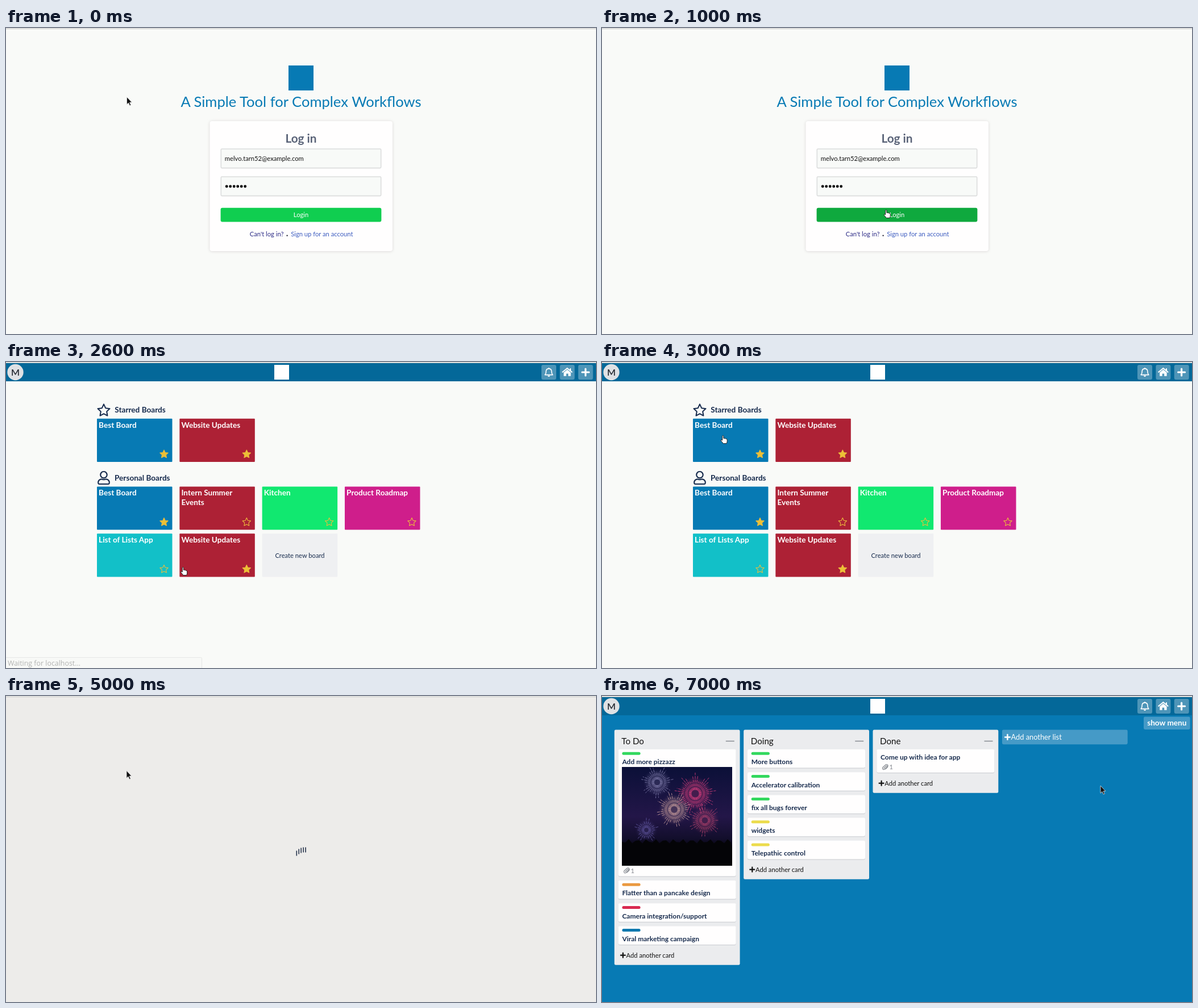
These frames come from a looping animation (1038 by 539 pixels, 8 s). An HTML page:

```html
<!DOCTYPE html>
<html lang="en">
<head>
<meta charset="utf-8">
<title>Kanban board</title>
<style>
html, body { margin: 0; width: 100%; height: 100%; overflow: hidden; background: #f9faf8; }
svg { display: block; width: 1038px; height: 539px; font-family: Lato, sans-serif; }
</style>
</head>
<body>
<svg id="stage" viewBox="0 0 1038 539">
  <defs>
    <filter id="soft" x="-10%" y="-10%" width="120%" height="120%"><feGaussianBlur stdDeviation="2.5"/></filter>
    <linearGradient id="sky" x2="0" y2="1">
      <stop stop-color="#0b1038"/><stop offset=".5" stop-color="#231648"/>
      <stop offset=".73" stop-color="#120e2b"/><stop offset=".82" stop-color="#050408"/>
    </linearGradient>
    <clipPath id="photo"><rect x="35" y="125" width="194" height="174"/></clipPath>
    <path id="star" d="M0-10 3-3.6 10-2.7 4.9 2.1 6.1 9 0 5.7-6.1 9-4.9 2.1-10-2.7-3-3.6Z" stroke-linejoin="round"/>
    <path id="arrow" d="M0 0V13.2L3 10.4 5.2 15.2 7.3 14.2 5.1 9.6H9Z"/>
    <path id="hand" fill="#fff" stroke="#222" stroke-linejoin="round" d="M3.2 9V1.8Q3.2.5 4.3.5T5.4 1.8V5.4Q6.6 4.6 7.5 5.8 8.9 5 9.7 6.4 11.6 6 11.7 8V11Q11.6 13 10.5 14.6H4.8Q3.6 12.6.8 9.7.2 8 1.7 8Z"/>
    <path id="clip" fill="none" stroke="#8b8f96" stroke-width="1.3" stroke-linecap="round" d="M-2 2 2-1.9Q3.2-2.8 3.8-1.8 4.2-1 3.4-.2L-.6 3.7Q-2.6 5-4 3.6-5.3 2-3.8.3L.6-3.8Q3-5.4 4.8-3.6 6-1.8 4.4 0L1 3.4"/>
  </defs>
</svg>
<script>
const stage = document.getElementById('stage');
const NAVY = '#172b4d', BLUE = '#077ab4', RED = '#ad2135', GREEN = '#33d85e', YELLOW = '#ecdc4c';

const rect = (x, y, w, h, fill, r = 0, extra = '') =>
  `<rect x="${x}" y="${y}" width="${w}" height="${h}" rx="${r}" fill="${fill}" ${extra}/>`;
const text = (x, y, size, fill, str, extra = '') =>
  `<text x="${x}" y="${y}" font-size="${size}" fill="${fill}" ${extra}>${str}</text>`;
const path = (d, color, width, extra = '') =>
  `<path d="${d}" fill="none" stroke="${color}" stroke-width="${width}" ${extra}/>`;
const use = (id, x, y, extra = '', scale = 1) =>
  `<use href="#${id}" transform="translate(${x} ${y}) scale(${scale})" ${extra}/>`;
const plus = (x, y, r, color, width) => path(`M${x - r} ${y}h${2 * r}M${x} ${y - r}v${2 * r}`, color, width, 'stroke-linecap="round"');
const BOLD = 'font-weight="700"', MID = 'text-anchor="middle"';
const topLine = rect(0, 0, 1038, 1, '#f1f1f0') + rect(0, 1, 1038, 1, '#c9cac8');

function login(hover) {
  const field = y => rect(378.3, y, 281.4, 33.6, '#f8faf8', 1.5, 'stroke="#dcdddd" stroke-width="1.6"');
  let dots = '';
  for (let i = 0; i < 6; i++) dots += `<circle cx="${388.2 + 6.5 * i}" cy="279" r="2.4"/>`;
  return rect(0, 0, 1038, 539, '#f9faf8') + topLine +
    rect(497, 66, 44, 44, BLUE) +
    text(519, 138.5, 25.6, BLUE, 'A Simple Tool for Complex Workflows', MID) +
    rect(358.5, 164.5, 321.5, 229, '#d9d5d5', 4, 'filter="url(#soft)"') +
    rect(358.5, 164, 321.5, 229, '#fffefe', 4) +
    text(519, 202, 20.8, '#5a6378', 'Log in', `${BOLD} ${MID}`) +
    field(213) + text(384.8, 234, 11.2, '#111', 'melvo.tarn52@example.com') +
    field(262) + dots +
    rect(377.6, 316.8, 282.8, 24.8, hover ? '#0fa93e' : '#10ce50', 3) +
    text(519, 333, 11.2, '#fff', 'Login', MID) +
    text(428.8, 367, 11.2, '#2c2b86', "Can't log in?") +
    '<circle cx="494.6" cy="365.6" r="1.2" fill="#223"/>' +
    text(501.2, 367, 11.2, '#3c5cc0', 'Sign up for an account');
}

function header() {
  const buttons = [942, 974.4, 1006.7].map(x => rect(x, 5, 26, 26, '#4e95b8', 3)).join('');
  return topLine + rect(0, 2, 1038, 32, '#046899') +
    '<circle cx="16.5" cy="18" r="14.2" fill="#dfe1e4"/>' +
    text(16.5, 23.8, 16, '#22262e', 'M', `${MID} font-weight="600"`) +
    rect(472, 5, 26, 26, '#fff') + buttons +
    path('M948.2 22.6Q950.2 20.6 950.2 16.2 950.4 12 955 11.6 959.6 12 959.8 16.2 959.8 20.6 961.8 22.6ZM955 11.4V10', '#fff', 1.6, 'stroke-linejoin="round"') +
    '<path d="M953 24h4a2 2.1 0 0 1-4 0" fill="#fff"/>' +
    path('M978.6 18.2 987.4 11 996.2 18.2M993 11.2v4', '#fff', 2) +
    '<path d="M981.2 18.6 987.4 13.6 993.6 18.6V24.8H989.2V20.4H985.6V24.8H981.2Z" fill="#fff"/>' +
    plus(1019.6, 18, 6, '#fff', 3.2);
}

function tile(col, row, color, lines, starred) {
  const x = 160 + 145.33 * col, y = [99.7, 219.4, 302.2][row];
  return rect(x, y, 132.5, 76.2, color, 1) +
    lines.map((s, i) => text(x + 3.1, y + 16 + 16.2 * i, 13.6, '#fff', s, BOLD)).join('') +
    use('star', x + 118, y + 62.4, `fill="${starred ? '#ecc036' : 'none'}" stroke="#ecbc3c" stroke-width="1.5"`, .72);
}

function boards(waiting) {
  const status = rect(-2, 520.5, 346.5, 22, '#f8f9f7', 2, 'stroke="#e6e7e6"') +
    text(3, 534.5, 12.4, '#b2b3b2', 'Waiting for localhost…', 'font-family="Open Sans, sans-serif"');
  return rect(0, 0, 1038, 539, '#f9faf8') + header() +
    use('star', 172, 85, `fill="none" stroke="${NAVY}" stroke-width="1.9"`, 1.06) +
    text(191.3, 89, 13.6, NAVY, 'Starred Boards', BOLD) +
    tile(0, 0, BLUE, ['Best Board'], true) +
    tile(1, 0, RED, ['Website Updates'], true) +
    path('M172 193a5.7 5.7 0 1 1-.1 0M168 206.4Q162.3 207 162.2 212.6 162.2 215 164 215H180Q181.8 215 181.8 212.6 181.7 207 176 206.4 172 208 168 206.4Z', NAVY, 2.1) +
    text(191, 208.6, 13.6, NAVY, 'Personal Boards', BOLD) +
    tile(0, 1, BLUE, ['Best Board'], true) +
    tile(1, 1, RED, ['Intern Summer', 'Events']) +
    tile(2, 1, '#11e870', ['Kitchen']) +
    tile(3, 1, '#cf1e8b', ['Product Roadmap']) +
    tile(0, 2, '#12c0c8', ['List of Lists App']) +
    tile(1, 2, RED, ['Website Updates'], true) +
    rect(450.7, 302.2, 132.5, 76.2, '#eff0f2', 1) +
    text(517, 344.6, 11.2, NAVY, 'Create new board', MID) +
    (waiting ? status : '');
}

function loading() {
  const tops = [272.5, 269.5, 267.5, 266.5, 266.5];
  return rect(0, 0, 1038, 539, '#edecea') + topLine +
    tops.map((y, i) => rect(510.5 + 3.95 * i, y, 1.6, 9, '#26344c')).join('');
}

function burst(x, y, r, color, rays) {
  let d = '';
  for (let i = 0; i < rays; i++) {
    const a = 2 * Math.PI * i / rays, len = r * (.78 + .22 * Math.sin(i * 5));
    const c = Math.cos(a), s = Math.sin(a);
    d += `M${x + c * r * .18} ${y + s * r * .18}L${x + c * len} ${y + s * len}`;
  }
  return `<circle cx="${x}" cy="${y}" r="${r * .7}" fill="${color}" opacity=".2" filter="url(#soft)"/>` +
    path(d, color, 1, 'opacity=".75" stroke-dasharray="5 1.5"');
}

function photo() {
  let crowd = 'M35 299V257';
  for (let x = 35; x <= 229; x += 6) crowd += `L${x} ${256 + 4 * Math.sin(x * 1.7)}`;
  return `<g clip-path="url(#photo)">` + rect(35, 125, 194, 174, 'url(#sky)') +
    burst(97, 152, 29, '#8c88b8', 34) + burst(78, 236, 22, '#6a5fae', 24) +
    burst(181, 219, 30, '#c94873', 32) + burst(164, 172, 37, '#f04484', 44) +
    burst(127, 200, 33, '#dfb0a8', 40) + `<path d="${crowd}V299Z" fill="#040407"/></g>`;
}

const label = (x, y, color) => rect(x, y, 32.2, 5, color, 2.5);
const cardBox = (x, y, h) => rect(x, y + 1, 207, h, '#c8cbd0', 2.4) + rect(x, y, 207, h, '#fffefe', 2.4);
const cardText = (x, y, str) => text(x, y, 12, NAVY, str, BOLD);
const card = (x, y, color, str) =>
  cardBox(x, y, 32.6) + label(x + 6.7, y + 4.7, color) + cardText(x + 6.7, y + 26.3, str);
const attachment = (x, y) => use('clip', x, y) + text(x + 7.6, y + 4, 11.2, '#85888f', '1');

function list(x, h, title, cards) {
  const y = 60 + h - 17;
  return rect(x, 59.6, 220.8, h + .2, '#ebecee', 2.4) +
    text(x + 12.5, 84.8, 15.2, '#111', title) +
    path(`M${x + 196} 79.5h15`, '#858a90', 1.5) + cards +
    plus(x + 15.1, y - .3, 4, '#111', 2.2) +
    text(x + 20.8, y + 4.2, 11.2, '#111', 'Add another card');
}

function board() {
  const todo = cardBox(28.7, 94, 223.5) + label(35.4, 98.7, GREEN) + cardText(35.4, 120.3, 'Add more pizzazz') +
    photo() + attachment(43, 307.5) +
    card(28.7, 325, '#ea9941', 'Flatter than a pancake design') +
    card(28.7, 365.2, '#d92a51', 'Camera integration/support') +
    card(28.7, 405.4, '#0d78ae', 'Viral marketing campaign');
  const doing = ['More buttons', 'Accelerator calibration', 'fix all bugs forever', 'widgets', 'Telepathic control']
    .map((s, i) => card(256, 94 + 40.2 * i, i < 3 ? GREEN : YELLOW, s)).join('');
  const done = cardBox(483.4, 94, 41) + cardText(490, 112.3, 'Come up with idea for app') + attachment(498, 125.2);
  return rect(0, 0, 1038, 539, BLUE) + header() +
    rect(953, 36.6, 81.6, 22.4, '#459ac7', 2.4) + text(993.8, 52, 13.6, '#fff', 'show menu', `${BOLD} ${MID}`) +
    list(21.8, 414, 'To Do', todo) + list(249.2, 263, 'Doing', doing) + list(476.5, 111, 'Done', done) +
    rect(703.9, 59.6, 220.8, 25.6, '#459ac7', 2.4) + plus(713.4, 72.4, 4.3, '#fff', 2.5) +
    text(719.6, 77, 12.8, '#fff', 'Add another list');
}

const arrow = (x, y, edge) => use('arrow', x, y, `fill="#111" stroke="${edge}" stroke-width=".8"`);
const hand = (x, y) => use('hand', x, y);

// Each scene: start time in ms, then its markup.
const scenes = [
  [0, login(false) + arrow(212.5, 121.5, '#eee')],
  [1000, login(true) + hand(495.5, 320)],
  [2000, boards(true) + hand(307, 361)],
  [3000, boards(false) + hand(208.5, 129)],
  [5000, loading() + arrow(212, 131.5, '#eee')],
  [6000, board() + hand(258.5, 133.5)],
  [7000, board() + arrow(877, 158, '#ddd')],
].map(([start, markup]) => {
  const node = document.createElementNS('http://www.w3.org/2000/svg', 'g');
  node.innerHTML = markup;
  stage.append(node);
  return { start, node };
});

function draw(now) {
  const t = now % 8000;
  const current = scenes.findLast(s => s.start <= t);
  for (const s of scenes) s.node.style.display = s === current ? '' : 'none';
  requestAnimationFrame(draw);
}
draw(performance.now());
</script>
</body>
</html>
```
